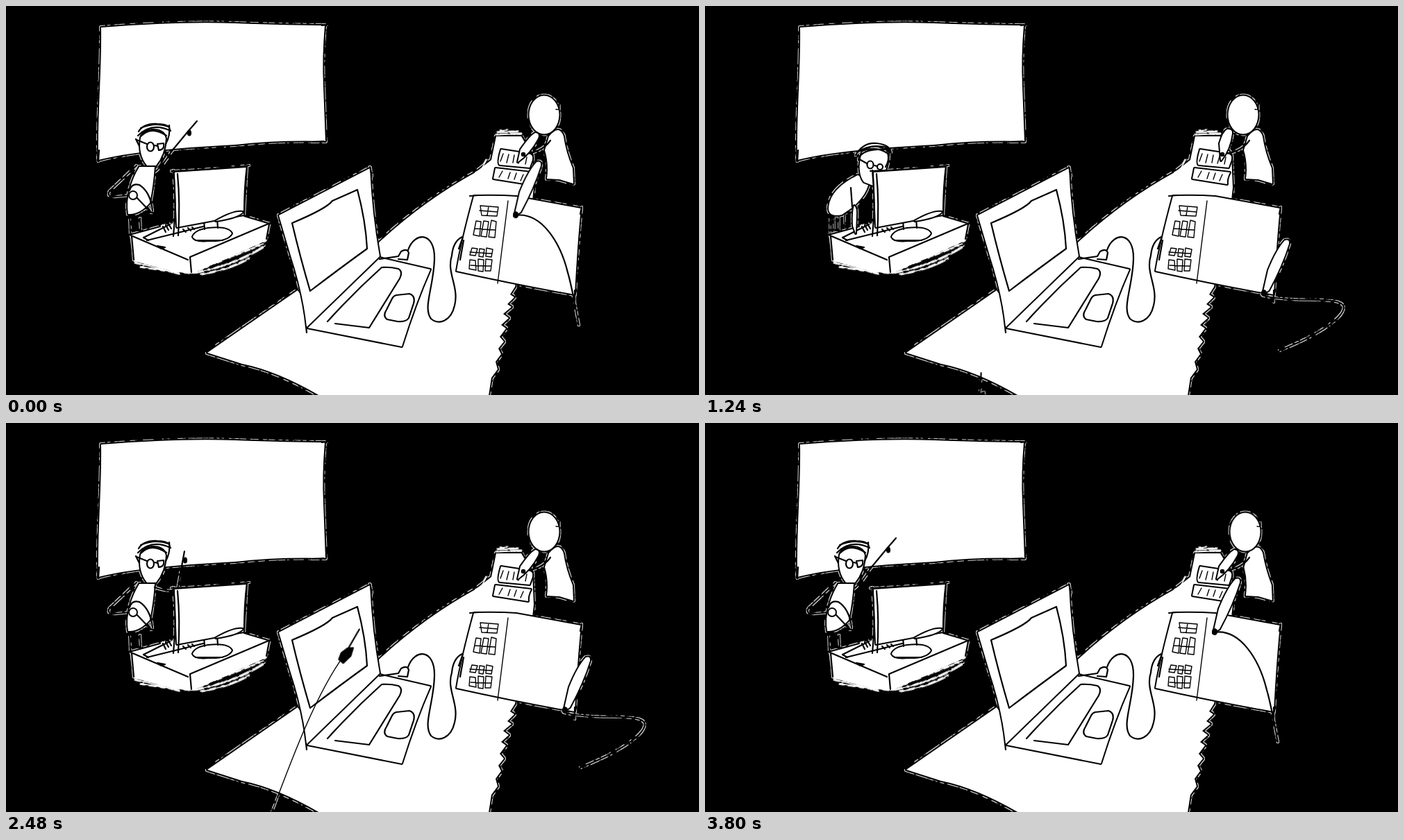
Write an HTML page without scripts that moves like this. It is 998x561 px and loops after 3.84 s.

```html
<!DOCTYPE html>
<html lang="en">
<head>
<meta charset="utf-8">
<title>Classroom sketch</title>
<style>
html, body { margin: 0; height: 100%; overflow: hidden; background: #000; }
svg { display: block; width: 100vw; height: 100vh; }

#art { filter: url(#rim); stroke-linecap: round; stroke-linejoin: round; }
#art path, #art ellipse, #art circle { fill: none; stroke: #000; stroke-width: 2.2px; }
/* Filled shapes carry their ink outside the white. */
#art .fill { fill: #fff; stroke-width: 4px; paint-order: stroke; }
#art .bare { fill: #fff; stroke: none; }
#art .thin { stroke-width: 1.4px; }
#art .blob { fill: #000; }
#art .chalk { stroke: #fff; stroke-width: 1.4px; }
#art .spark { stroke: #b4b4b4; stroke-width: 1.6px; }

.stand, .lean, .lean-body, .pointer, .knob, .pupil-head, .pupil-body, .cord, .pen, .reach, .reach-arm, .spark {
  animation: 3.84s linear infinite;
}
.stand { animation-name: stand; animation-timing-function: step-end; }
.lean { animation-name: lean; animation-timing-function: step-end; }
.lean-body { animation-name: rise; }
.pointer { animation-name: point; }
.knob { animation-name: knob; }
.pupil-head { animation-name: nod; }
.pupil-body { animation-name: sway; }
.cord { animation-name: cord; }
.pen { animation-name: pen; }
.reach { animation-name: reach; }
.reach-arm { animation-name: reach-arm; }
.spark { animation-name: spark; animation-timing-function: step-end; }
.type { animation: type .48s linear infinite; }
.write { animation: write .48s linear infinite; }

@keyframes stand { 0% { opacity: 1 } 3.1% { opacity: 0 } 61.4%, 100% { opacity: 1 } }
@keyframes lean { 0% { opacity: 0 } 3.1% { opacity: 1 } 61.4%, 100% { opacity: 0 } }
@keyframes rise {
  0%, 3.1% { transform: translate(-16px, -18px) }
  6.5%, 58% { transform: none }
  61.4%, 100% { transform: translate(-16px, -18px) }
}
@keyframes type { 0%, 36%, 54%, 72%, 100% { transform: none } 18%, 86% { transform: translate(-1px, -4px) } }
@keyframes point {
  0%, 98%, 100% { d: path("M216 238Q228 228 238 210L262 181L275 166") }
  61%, 78% { d: path("M214 237Q236 245 247 240L252 212L257 185") }
}
@keyframes knob { 0%, 98%, 100% { transform: translate(264px, 183px) } 61%, 78% { transform: translate(258px, 198px) } }
@keyframes write {
  0%, 36%, 91%, 100% { d: path("M737 225L741 207Q757 184 763 183Q769 184 766 191Q755 212 737 225Z") }
  53%, 72% { d: path("M743 223L741 198Q746 181 752 178Q760 177 759 184Q756 207 743 223Z") }
}
@keyframes nod { 0%, 65%, 100% { transform: none } 73%, 90.5% { transform: translate(18px, 3px) } 99% { transform: translate(3px, 0) } }
@keyframes sway {
  0%, 65%, 100% { d: path("M782 188Q797 170 803 188Q806 210 816 234L817 256L797 250L779 249Q782 228 776 208Z") }
  73%, 90.5% { d: path("M780 190Q792 180 804 183Q813 210 815 232L815 253L796 250L777 249Q781 228 780 208Z") }
}
@keyframes pen {
  0%, 98%, 100% { transform: none }
  8.33% { transform: translate(36px, 22px) }
  15%, 21% { transform: translate(84px, 43px) }
  31.3%, 89.5% { transform: translate(71px, 113px) }
}
@keyframes cord {
  0%, 98%, 100% { d: path("M733 302C770 296 798 340 809 385C815 405 820 435 825 460") }
  8.33% { d: path("M768 322C815 320 862 312 854 362C846 410 828 455 812 464") }
  15%, 21% { d: path("M819 343C845 350 853 362 852 385C854 405 830 460 820 480") }
  31.3%, 89.5% { d: path("M805 418C850 428 890 420 912 427C937 435 900 468 827 497") }
}
@keyframes reach {
  0%, 30% { transform: translate(385px, 615px) }
  44% { transform: translate(455px, 350px) }
  54.17% { transform: translate(468px, 325px) }
  66% { transform: translate(492px, 336px) rotate(30deg) }
  75%, 80% { transform: translate(520px, 339px) rotate(57deg) }
  89%, 100% { transform: translate(385px, 615px) }
}
@keyframes reach-arm {
  0%, 30% { d: path("M385 615C385 620 382 630 380 640") }
  44% { d: path("M455 350C445 410 425 500 384 563") }
  54.17% { d: path("M467 325C455 390 440 500 387 562") }
  66% { d: path("M490 336C445 390 405 490 382 562") }
  75%, 80% { d: path("M518 341C450 390 372 460 378 562") }
  89%, 100% { d: path("M385 615C385 620 382 630 380 640") }
}
@keyframes spark { 0% { opacity: 0 } 75% { opacity: 1 } 81.2%, 100% { opacity: 0 } }
</style>
</head>
<body>
<svg viewBox="0 0 998 561" preserveAspectRatio="none">
<!-- broken pale rim around all ink -->
<filter id="rim" filterUnits="userSpaceOnUse" x="0" y="0" width="998" height="561" color-interpolation-filters="sRGB">
  <feMorphology in="SourceAlpha" operator="dilate" radius="1" result="grown"/>
  <feTurbulence type="fractalNoise" baseFrequency=".14" numOctaves="2" seed="4"/>
  <feColorMatrix values="0 0 0 0 .8  0 0 0 0 .8  0 0 0 0 .8  9 0 0 0 -3.6"/>
  <feComposite in2="grown" operator="in" result="edge"/>
  <feMerge><feMergeNode in="edge"/><feMergeNode in="SourceGraphic"/></feMerge>
</filter>
<rect width="998" height="561"/>
<g id="art">
  <!-- board -->
  <path class="fill" d="M137 31Q250 22 330 25T459 28Q455 75 457 115L460 195Q395 193 330 200Q190 207 133 222C132 150 138 90 137 31Z"/>
  <path d="M441 196L458 195M455 28L462 27M134 208L133 224"/>

  <!-- teacher upright -->
  <g class="stand">
    <path d="M188 230L149 267Q144 276 158 275L178 273M178 302L179 328M193 306L194 324"/>
    <path class="fill" d="M192 232L214 232Q212 260 207 284Q192 301 176 300Q173 282 179 262Q183 247 192 232Z"/>
    <path d="M178 266Q181 255 192 258Q208 268 211 295M188 276L209 298L204 290"/>
    <circle class="fill" cx="183" cy="273" r="5"/>
    <path class="fill" d="M194 190Q190 214 203 230L216 230Q229 214 230 191Q227 178 210 179Q196 181 194 190Z"/>
    <path d="M191 181Q198 169 218 170Q236 170 236 179M190 187Q210 167 237 180M194 176Q215 167 234 174M235 172Q237 187 230 199M194 188Q209 172 231 187M188 193L203 199M187 192L192 202M214 201L218 202"/>
    <ellipse cx="208" cy="203" rx="5" ry="6.5"/>
    <path d="M218 199L227 198Q229 207 220 208Z"/>
    <path class="pointer" d="M216 238Q228 228 238 210L262 181L275 166"/>
    <ellipse class="knob blob" rx="2" ry="3.5"/>
  </g>

  <!-- teacher at the keyboard -->
  <g class="lean">
    <path class="thin" d="M180 303V326M186 304V324M193 304V322M201 302V318"/>
    <g class="lean-body">
      <path class="fill" d="M220 244Q181 263 178 290Q177 305 197 301L213 290Q235 270 236 252Z"/>
      <path class="fill" d="M226 211Q218 240 229 254L242 259L256 244Q265 230 264 211Q244 196 226 211Z"/>
      <path d="M217 215Q228 196 247 198Q267 200 268 212M221 222Q224 204 267 207M219 211Q240 197 266 205M226 209Q248 201 265 214M262 210Q267 220 260 232M224 222L233 227M244 230L248 231"/>
      <ellipse cx="238" cy="229" rx="4.5" ry="5.5"/><circle cx="252" cy="232" r="4"/>
    </g>
  </g>

  <!-- teacher's desk -->
  <path class="bare" d="M179 330L225 316L342 303L379 313L376 338L268 386L240 383L185 368Z"/>
  <path d="M178 330L222 318M180 331L262 366M265 362L378 314M265 362L267 384M343 303L380 314M379 315L375 336M198 334L236 315M203 338L284 318M198 334L205 338M181 332L184 366"/>
  <path d="M226 318l4 8M230 316l4 7M234 314l4 7M255 322l4 4M262 320l4 4M268 319l3 3"/>
  <path class="blob" d="M218 346L229 348L224 350Z"/>
  <path class="chalk" d="M270 385Q330 374 373 346M275 381L370 343M280 387Q320 381 350 364M186 370L250 386M194 376L246 384"/>
  <path class="fill" d="M269 333Q272 324 291 321Q320 318 325 328Q319 339 292 338Q272 340 269 333Z"/>
  <path d="M285 309L286 322M304 306L305 320M273 338H312"/>
  <path class="fill" d="M243 240L346 233L342 301L246 319Z"/>
  <path class="fill" d="M302 310Q328 295 341 297Q335 305 302 310Z"/>
  <path d="M238 238Q296 236 350 230M241 237Q246 285 241 332M247 242Q251 285 248 331M347 231Q343 262 343 300"/>

  <!-- typing hand -->
  <g class="lean"><g class="type">
    <path d="M210 262L212 290"/>
    <path class="fill" d="M215 288Q219 291 218 304L217 328L213 317Q212 295 215 288Z"/>
  </g></g>

  <!-- long table -->
  <path class="fill" d="M290 500L420 410L440 440L536 342Q600 282 676 240L699 222L706 188L742 188L758 215L760 262L758 280L733 405L726 416L732 420L722 430L728 434L716 444L724 450L713 460L720 465L711 477L717 484L709 494L713 502L705 513L708 524L699 536L695 562H452Q390 526 340 516Z"/>
  <path class="chalk" d="M708 182L737 181M706 186L743 184M712 180L722 179M676 240L696 230M680 244L692 222"/>

  <!-- papers -->
  <path class="fill" d="M713 207L752 213Q760 214 758 222L754 233L711 229Q707 227 713 207Z"/>
  <path class="fill" d="M705 234L756 240Q751 249 752 257L702 249Z"/>
  <path class="thin" d="M716 213L712 224M724 214L721 226M732 215L730 226M741 217L738 227M750 218L748 228M715 238L710 247M726 240L723 249M735 241L732 250M745 243L741 252"/>

  <!-- sheet -->
  <path class="fill" d="M674 274Q710 273 735 275L828 292Q823 340 819 416Q735 401 649 382Q656 340 674 274Z"/>
  <path d="M668 274L680 273M829 290L827 300M819 410V427M658 333L652 350M659 338L654 366"/>
  <path class="thin" d="M723 281L708 400"/>
  <path class="thin" d="M683 288L709 290L707 303L685 302ZM695 289L693 302M682 295L708 297M677 310L684 311L682 332L673 330ZM688 310L695 311L692 333L684 332ZM699 309L706 311L704 334L695 333ZM675 321L704 323M671 349L679 350L676 360L668 359ZM682 350L689 351L687 362L681 361ZM692 349L701 351L699 362L691 361ZM668 355L700 357M668 366L676 367L677 381L667 379ZM680 365L688 366L687 383L680 382ZM691 365L700 366L698 382L690 382ZM669 374L698 375"/>

  <!-- laptop -->
  <path class="fill" d="M434 464L538 363L611 380Q589 430 570 491Z"/>
  <path class="fill" d="M393 302L524 234Q527 300 538 361L433 463Q428 415 410 360Z"/>
  <path d="M412 313Q462 292 470 281L506 265Q518 310 520 350Q480 379 438 411Q423 360 412 313ZM432 462L433 471M524 232L527 245"/>
  <path d="M463 455Q500 414 541 377Q553 376 565 379Q572 383 567 393L523 464L474 458"/>
  <path d="M562 417L581 415Q590 418 587 429L580 450Q576 456 564 455L549 452Q542 447 548 438L556 422Q558 418 562 417Z"/>
  <path d="M538 365L565 361L569 354Q578 349 580 356L578 366L565 365"/>
  <path d="M579 352C588 325 618 325 617 365C616 405 600 435 612 451C624 461 641 454 646 432C653 405 634 385 642 360Q644 339 657 333"/>

  <!-- pupil -->
  <path class="pupil-body fill" d="M782 188Q797 170 803 188Q806 210 816 234L817 256L797 250L779 249Q782 228 776 208Z"/>
  <g class="pupil-head">
    <ellipse class="fill" cx="775" cy="157" rx="21.5" ry="27.5"/>
    <path class="thin" d="M797 143Q798 151 792 149"/>
  </g>
  <path d="M745 213Q771 212 784 194"/>
  <path class="write fill" d="M737 225L741 207Q757 184 763 183Q769 184 766 191Q755 212 737 225Z"/>
  <circle class="blob" cx="745" cy="214" r="2.2"/>

  <!-- near hand and its pen -->
  <path class="cord" d="M733 302C770 296 798 340 809 385C815 405 820 435 825 460"/>
  <g class="pen">
    <path class="fill" d="M732 303L740 268Q752 238 764 225Q771 223 770 230Q760 262 741 297Z"/>
    <ellipse class="blob" cx="734" cy="301" rx="3" ry="4"/>
  </g>

  <!-- hand at the laptop -->
  <path class="reach-arm thin" d="M385 615C385 620 382 630 380 640"/>
  <g class="reach">
    <path d="M1 -42L-1 -9"/>
    <path class="blob" d="M-2 -10L5 -14L7 -2L2 12L-6 10L-7 0Z"/>
  </g>
  <path class="spark" d="M540 468Q545 463 553 460M563 460L569 478M580 447L597 451M577 460L600 462M538 440L549 437M555 466L549 471"/>
</g>
</svg>
</body>
</html>
```
